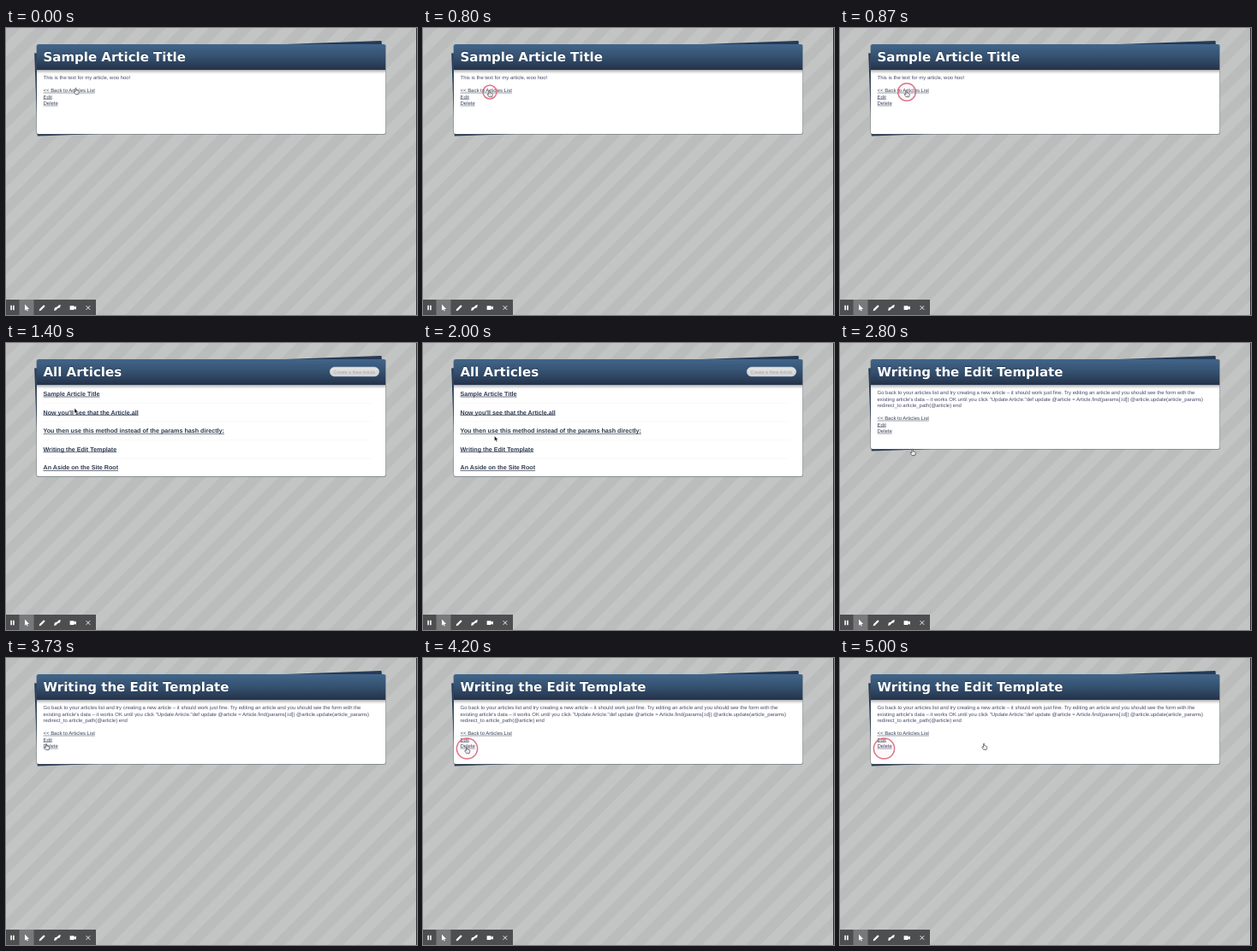
An HTML page for the animation above (5070 ms loop, 480 by 336 pixels).

```html
<!DOCTYPE html>
<html lang="en">
<head>
<meta charset="utf-8">
<title>Articles</title>
<style>
  html, body { margin: 0; width: 100%; height: 100%; overflow: hidden; background: #bfc2c0; }
  svg { display: block; width: 100vw; height: 100vh; }
  text { font-family: "Liberation Sans", Arial, sans-serif; text-rendering: geometricPrecision; white-space: pre; }
  .title { font: bold 15px "DejaVu Sans", sans-serif; fill: #fff; }
  .shade { fill: #17233a; opacity: .7; }
  .body { font-size: 5.98px; fill: #48496a; }
  .link { font-size: 5.98px; fill: #38425a; }
  .item { font-size: 7.17px; font-weight: bold; fill: #2f3b50; }
  .button { font-size: 5.35px; fill: #a3a3a6; }
</style>
</head>
<body>
<svg viewBox="0 0 480 336">
  <defs>
    <pattern id="stripes" width="24" height="24" patternUnits="userSpaceOnUse" patternTransform="rotate(45)">
      <rect width="24" height="24" fill="#c2c5c3"/>
      <rect width="12" height="24" fill="#babdbb"/>
    </pattern>
    <linearGradient id="head" x2="0" y2="1">
      <stop stop-color="#41658a"/>
      <stop offset=".5" stop-color="#34506f"/>
      <stop offset="1" stop-color="#243249"/>
    </linearGradient>
    <linearGradient id="fade" x2="0" y2="1">
      <stop stop-color="#555" stop-opacity=".5"/>
      <stop offset="1" stop-color="#999" stop-opacity="0"/>
    </linearGradient>
    <linearGradient id="pill" x2="0" y2="1">
      <stop stop-color="#e6e6e6"/>
      <stop offset="1" stop-color="#cfd0d1"/>
    </linearGradient>
  </defs>

  <rect width="480" height="336" fill="url(#stripes)"/>
  <rect x="479" width="1" height="336" fill="#2b2c2e"/>

  <path d="M33.2 29.5L437.6 15.1Q438.6 15 438.7 16L441 112.5L36.8 126.5Z" fill="#263a57"/>
  <rect id="shadow" x="35.5" y="19" width="408.4" rx="2.2" fill="#59616c" opacity=".7"/>
  <rect id="card" x="36" y="19" width="407.3" rx="2" fill="#fff"/>
  <path d="M36 49V21Q36 19 38 19H441.3Q443.3 19 443.3 21V49Z" fill="url(#head)"/>
  <rect x="36" y="49" width="407.3" height="5" fill="url(#fade)"/>
  <g id="pages"></g>

  <g id="toolbar">
    <rect y="318" width="105" height="18" fill="#4d4e50"/>
    <rect x="15.5" y="318" width="17" height="18" fill="#77797a"/>
    <g fill="#fff">
      <path d="M5.3 324.8h1.6v5.4h-1.6zM8.1 324.8h1.6v5.4h-1.6z"/>
      <path d="M22 323.6v7.2l1.7-1.5 1 2.3 1.1-.5-1-2.2h2.3z"/>
      <path d="M38.6 331.3l.6-2.2 4.9-4.9 1.6 1.6-4.9 4.9z"/>
      <path d="M56.2 331l.6-3.4 2.4-.8 2.6-2.4 2-.3-.7 3.1-2.5.9-2.4 2.4z"/>
      <path d="M74.6 325.2h5v1.5l2.3-1.2v4.2l-2.3-1.2v1.6h-5z"/>
    </g>
    <path d="M93.6 325.2l4.6 4.6M98.2 325.2l-4.6 4.6" stroke="#fff" stroke-width=".9"/>
  </g>

  <circle id="ring" fill="#d8607a" fill-opacity=".04" stroke="#d9667c" stroke-width="1.5" stroke-opacity=".9"/>
  <g id="hand">
    <path d="M-1 -1.3Q-.4 -2.2 .2 -1.3V1L2.5 1.5Q3.5 1.9 3.3 3L2.6 5.6H-.9L-2.7 2.9Q-2.8 1.8 -1.8 2.1L-1 2.8Z"
      fill="#fff" stroke="#30333a" stroke-width=".65" stroke-linejoin="round"/>
    <path d="M.5 3v1.6M1.6 3v1.6" stroke="#777" stroke-width=".3"/>
  </g>
  <path id="arrow" d="M0 -.5V5L1.3 3.9L2.2 6L3.2 5.6L2.3 3.5H4Z" fill="#111" stroke="#eee" stroke-width=".35"/>
</svg>

<script>
const LOOP = 5070, STEP = 200 / 3, LEFT = 43.5;
const LIST_TOP = 62, LIST_GAP = 21.6;
const $ = id => document.getElementById(id);

function el(parent, tag, attrs, content = "") {
  const node = document.createElementNS("http://www.w3.org/2000/svg", tag);
  for (const key in attrs) node.setAttribute(key, attrs[key]);
  node.textContent = content;
  return parent.appendChild(node);
}

function page(title) {
  const g = el($("pages"), "g", {});
  el(g, "text", { x: LEFT, y: 38.4, class: "title shade" }, title);
  el(g, "text", { x: LEFT, y: 39, class: "title" }, title);
  return g;
}

function underlined(g, y, cls, label) {
  const node = el(g, "text", { x: LEFT, y, class: cls }, label);
  const bold = cls === "item";
  el(g, "rect", {
    x: LEFT, y: y + .65, width: node.getComputedTextLength(),
    height: bold ? .7 : .5, fill: bold ? "#2f3b50" : "#38425a"
  });
}

function article(title, lines) {
  const g = page(title);
  lines.forEach((line, i) => el(g, "text", { x: LEFT, y: 60.1 + i * 7.5, class: "body" }, line));
  const top = 60.1 + (lines.length + 1) * 7.5;
  ["<< Back to Articles List", "Edit", "Delete"].forEach((label, i) =>
    underlined(g, top + i * 7.5, "link", label));
  return g;
}

function list(items) {
  const g = page("All Articles");
  el(g, "rect", { x: 378.3, y: 28.2, width: 57.4, height: 10.8, rx: 5.4,
    fill: "url(#pill)", stroke: "#eef0f2", "stroke-width": .4 });
  el(g, "text", { x: 382.6, y: 35.5, class: "button" }, "Create a New Article");
  items.forEach((label, i) => {
    const y = LIST_TOP + i * LIST_GAP;
    underlined(g, y, "item", label);
    if (i < items.length - 1)
      el(g, "path", { d: `M${LEFT} ${y + 8.4}H428`, stroke: "#e6e6e6", "stroke-width": .5, "stroke-dasharray": "1 1" });
  });
  return g;
}

const views = [
  article("Sample Article Title", ["This is the text for my article, woo hoo!"]),
  list([
    "Sample Article Title",
    "Now you'll see that the Article.all",
    "You then use this method instead of the params hash directly:",
    "Writing the Edit Template",
    "An Aside on the Site Root"
  ]),
  article("Writing the Edit Template", [
    "Go back to your articles list and try creating a new article – it should work just fine. Try editing an article and you should see the form with the",
    "existing article's data – it works OK until you click \"Update Article.\"def update @article = Article.find(params[:id]) @article.update(article_params)",
    "redirect_to article_path(@article) end"
  ])
];

// Pointer path: step, x, y
const path = [
  [0, 82, 72], [1, 82, 72], [5, 78, 75], [20, 78, 75], [21, 80, 77], [28, 83, 104],
  [36, 85, 126], [42, 85, 126], [49, 82, 122], [56, 47.5, 102], [58, 51.5, 106],
  [72, 51.5, 106], [75, 168.5, 101.7]
];

// Clicks: first step, end step, starting phase, x, y
const clicks = [[11, 16, 1, 78, 75], [39, 42, 5, 85, 126], [58, 77, 1, 51.5, 106]];

function pointerAt(k) {
  const i = path.findIndex(p => p[0] >= k);
  if (i < 1) return path[i < 0 ? path.length - 1 : 0].slice(1);
  const [a, b] = [path[i - 1], path[i]];
  const u = (k - a[0]) / (b[0] - a[0]);
  return [a[1] + (b[1] - a[1]) * u, a[2] + (b[2] - a[2]) * u];
}

function isHand(k, y) {
  if (k > 20 && k < 42) {
    const d = (y - LIST_TOP + 2) / LIST_GAP;
    return Math.abs(d - Math.round(d)) * LIST_GAP < 4.4;
  }
  return !(k > 42 && k < 55);
}

function draw(ms) {
  const k = Math.floor((ms % LOOP + 7) / STEP);
  const view = k < 16 ? 0 : k < 42 ? 1 : 2;
  views.forEach((g, i) => g.setAttribute("visibility", i === view ? "visible" : "hidden"));
  const height = view === 1 ? 137 : 105;
  $("card").setAttribute("height", height);
  $("shadow").setAttribute("height", height + .8);

  const [x, y] = pointerAt(k), hand = isHand(k, y);
  for (const [id, on] of [["hand", hand], ["arrow", !hand]]) {
    $(id).setAttribute("transform", `translate(${x} ${y})`);
    $(id).setAttribute("visibility", on ? "visible" : "hidden");
  }

  const click = clicks.find(c => k >= c[0] && k < c[1]);
  $("ring").setAttribute("visibility", click ? "visible" : "hidden");
  if (click) {
    const [start, , phase, cx, cy] = click;
    const u = Math.min(1, (k - start + phase) / 5);
    $("ring").setAttribute("cx", cx);
    $("ring").setAttribute("cy", cy);
    $("ring").setAttribute("r", 12.1 * (1 - (1 - u) ** 2.1));
  }
}

const begin = performance.now();
function tick() {
  draw(performance.now() - begin);
  requestAnimationFrame(tick);
}
tick();
</script>
</body>
</html>
```
